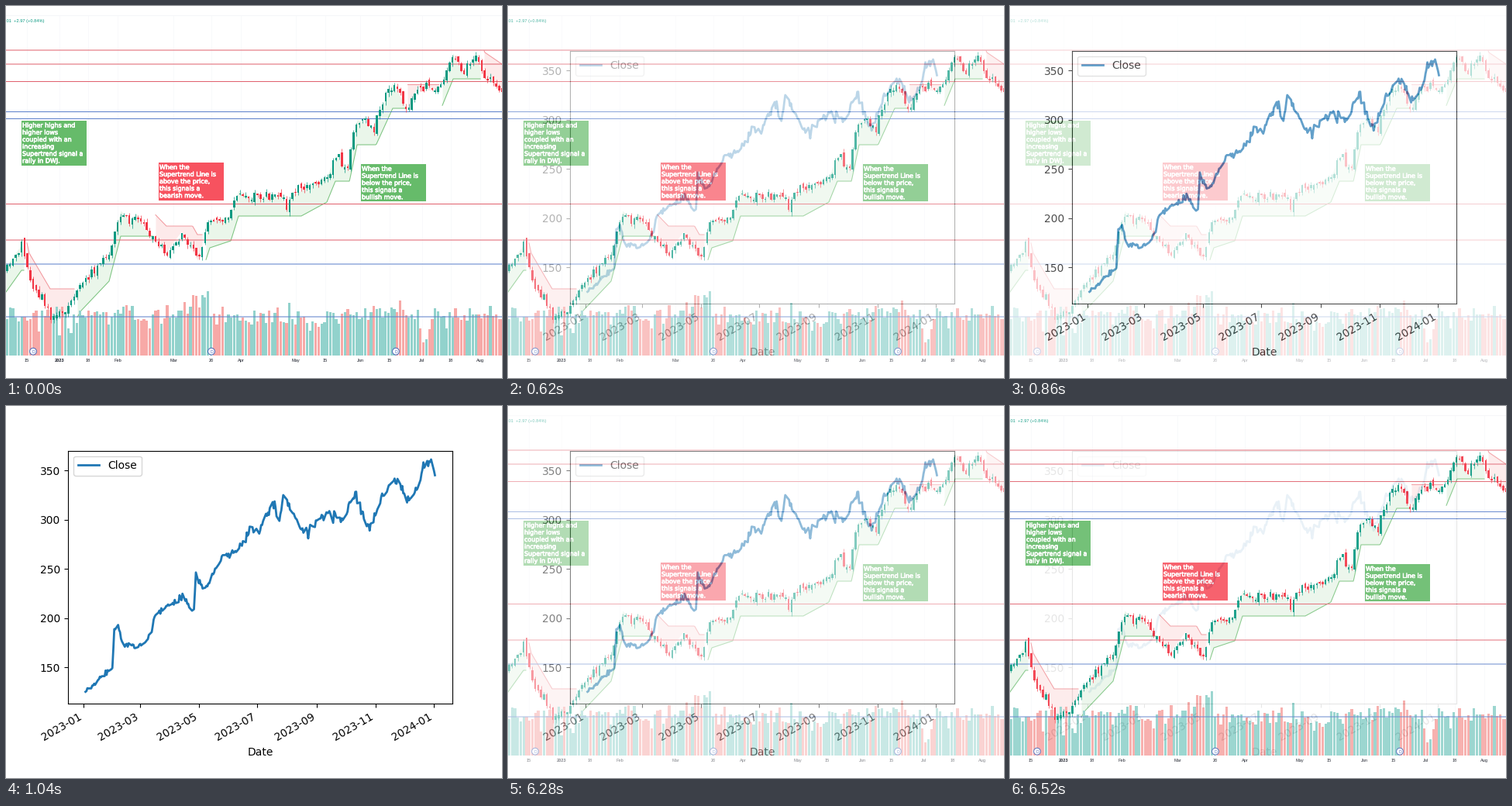
Write a matplotlib script that moves like this. It is 640 by 480 pixels and loops after 6580 ms.

```python
import numpy as np
import matplotlib.pyplot as plt
import matplotlib.dates as mdates
from matplotlib.animation import FuncAnimation
from matplotlib.patches import Circle, Rectangle
from matplotlib.patheffects import withStroke

W, H, DPI = 640, 480, 100
LOOP, STEP = 6580, 20
PX = 72 / DPI  # points per pixel

UP, DOWN = "#089981", "#f23645"
VOL_UP, VOL_DOWN = "#92d2cc", "#f7a9a7"
BULL, BEAR = 1, -1
TREND_STYLE = {BULL: ("#7cc480", "#eaf6ea"), BEAR: ("#f2959b", "#fdeaea")}
GREEN_BOX, RED_BOX = "#66bb6a", "#f7525f"

# Turning points of the candles, in stage pixels
COURSE = np.array([
    (0, 336), (20, 308), (30, 352), (57, 398), (78, 392), (97, 360),
    (133, 322), (148, 264), (160, 278), (168, 268), (178, 287), (207, 317),
    (226, 291), (247, 328), (263, 279), (290, 270), (300, 238), (320, 248),
    (355, 243), (361, 261), (368, 245), (414, 220), (425, 193), (440, 208),
    (453, 146), (473, 156), (499, 99), (518, 134), (530, 106), (557, 110),
    (577, 61), (588, 86), (606, 67), (618, 93), (640, 108),
])

# Spans of the Supertrend line: from, to, side
SPANS = [(0, 23, BULL), (27, 88, BEAR), (92, 190, BULL), (193, 253, BEAR),
         (258, 515, BULL), (518, 558, BEAR), (563, 612, BULL), (617, 640, BEAR)]

NOTES = [
    (20, 148, 58, GREEN_BOX, "Higher highs and\nhigher lows\ncoupled with an\n"
                             "increasing\nSupertrend signal a\nrally in DWJ."),
    (197, 202, 49, RED_BOX, "When the\nSupertrend Line is\nabove the price,\n"
                            "this signals a\nbearish move."),
    (458, 204, 48, GREEN_BOX, "When the\nSupertrend Line is\nbelow the price,\n"
                              "this signals a\nbullish move."),
]

DATES = {27: "15", 69: "2023", 106: "18", 144: "Feb", 216: "Mar", 265: "20",
         303: "Apr", 374: "May", 412: "15", 457: "Jun", 495: "15", 537: "Jul",
         574: "18", 612: "Aug"}

# Turning points of the closing price: day, value
CLOSES = np.array([
    (0, 125), (28, 150), (30, 188), (35, 191), (38, 175), (54, 170),
    (68, 181), (72, 203), (101, 221), (113, 209), (115, 241), (122, 233),
    (128, 235), (143, 262), (157, 267), (171, 287), (181, 286), (191, 312),
    (197, 315), (201, 292), (206, 325), (228, 285), (253, 307), (268, 300),
    (281, 326), (296, 290), (315, 334), (323, 341), (338, 318), (348, 336),
    (352, 352), (359, 358), (364, 345),
])


def bump(x, centre, width, height):
    return height * np.exp(-((x - centre) / width) ** 2)


def stage(fig):
    ax = fig.add_axes([0, 0, 1, 1])
    ax.set(xlim=(0, W), ylim=(H, 0))
    ax.axis("off")
    return ax


def draw_trend(ax, gap=33):
    """Trail the price at a fixed gap, never stepping back."""
    for start, end, side in SPANS:
        x = np.arange(start, end + 1)
        price = np.interp(x, *COURSE.T)
        ratchet = np.minimum if side == BULL else np.maximum
        trail = ratchet.accumulate(price + side * gap)
        line, fill = TREND_STYLE[side]
        ax.fill_between(x, trail, price, color=fill, lw=0, zorder=1)
        ax.plot(x, trail, color=line, lw=PX, zorder=2)


def draw_bars(ax):
    rng = np.random.default_rng(12)
    x = np.arange(1.4, W + 2, 3.757)
    n = len(x)
    close = np.interp(x, *COURSE.T) + rng.normal(0, 4, n)
    open_ = np.r_[close[0] + 6, close[:-1]] + rng.normal(0, 2, n)
    rising = close < open_
    top = np.minimum(open_, close)
    body = np.maximum(np.abs(close - open_), 1.5)

    vol = (50 + rng.normal(0, 8, n) + bump(x, 150, 9, 18) + bump(x, 243, 4, 40)
           + bump(x, 256, 7, 36) + bump(x, 485, 40, 8) - bump(x, 539, 6, 34))
    vol = np.clip(vol, 17, 96)
    ax.bar(x, -vol, 3.2, bottom=451, zorder=3,
           color=np.where(rising, VOL_UP, VOL_DOWN))

    tint = np.where(rising, UP, DOWN)
    ax.vlines(x, top - rng.uniform(0.5, 5, n),
              top + body + rng.uniform(0.5, 5, n),
              colors=tint, lw=0.7 * PX, zorder=5)
    ax.bar(x, body, 2.5, bottom=top, color=tint, zorder=5)


def draw_note(ax, x, y, height, color, text):
    ax.add_patch(Rectangle((x, y), 84, height, color=color, lw=0, zorder=6))
    for i, row in enumerate(text.split("\n")):
        ax.text(x + 1, y + 8.6 + 9.15 * i, row, color="white", size=8 * PX,
                zorder=7, path_effects=[withStroke(linewidth=0.45,
                                                   foreground="white")])


def draw_market(fig):
    ax = stage(fig)
    ax.vlines(list(DATES), 12, 451, colors="#f8f9fb", lw=PX, zorder=0)
    ax.axhline(12, color="#f4f5f8", lw=PX, zorder=0)
    draw_trend(ax)
    draw_bars(ax)
    for color, levels in (("#e0616d", (57, 75, 97.5, 255.5, 302)),
                          ("#5b7fcb", (136.5, 145.5, 333, 401))):
        for y in levels:
            ax.axhline(y, color=color, lw=PX, snap=False, zorder=4)
    for note in NOTES:
        draw_note(ax, *note)

    for x in (35, 265, 503):
        ax.add_patch(Circle((x, 445.7), 4.4, fc="white", ec="#4a68b8",
                            lw=PX, zorder=6))
        ax.text(x, 445.9, "D", color="#4a68b8", size=5 * PX, ha="center",
                va="center_baseline", zorder=7)
    small = dict(family="Liberation Sans", size=5.7 * PX)
    for x, text in DATES.items():
        ax.text(x, 459.3, text, color="#131722", ha="center",
                weight="bold" if text == "2023" else "normal", **small)
    ax.text(-1, 21.3, ".01  +2.97 (+0.84%)", color=UP, **small)


def draw_closes(fig):
    ax = fig.add_subplot()
    start = np.datetime64("2023-01-03")
    days = np.busday_offset(start, np.arange(261))
    t = (days - start).astype(int)
    noise = np.random.default_rng(4).normal(0, 0.009, len(t))
    noise[[0, -1]] = 0
    ax.plot(days, np.interp(t, *CLOSES.T) * (1 + noise), lw=2, label="Close")
    ax.set_ylim(113, 370)
    ax.xaxis.set_major_locator(mdates.MonthLocator(bymonth=range(1, 13, 2)))
    ax.xaxis.set_major_formatter(mdates.DateFormatter("%Y-%m"))
    ax.set_xlabel("Date")
    ax.legend(loc="upper left")
    fig.autofmt_xdate()


def render(draw):
    """Draw a scene on the figure and keep it as one flat layer."""
    draw(fig)
    fig.canvas.draw()
    layer = np.array(fig.canvas.buffer_rgba())
    fig.clear()
    return layer


def mix(t):
    """Share of the closing-price plot at t ms, in steps of a tenth."""
    if t < 500:
        return 0.0
    if t < 6040:
        return min(1.0, ((t - 500) // 60 + 1) / 10)
    return 1 - ((t - 6040) // 60 + 1) / 10


fig = plt.figure(figsize=(W / DPI, H / DPI), dpi=DPI, facecolor="white")
market = render(draw_market)
closes = render(draw_closes)

view = stage(fig)
style = dict(extent=(0, W, H, 0), aspect="auto", interpolation="nearest")
view.imshow(market, **style)
overlay = view.imshow(closes, alpha=0.0, **style)


def update(i):
    overlay.set_alpha(mix(i * STEP))
    return [overlay]


anim = FuncAnimation(fig, update, frames=LOOP // STEP, interval=STEP,
                     repeat=True, repeat_delay=0)
plt.show()
```
